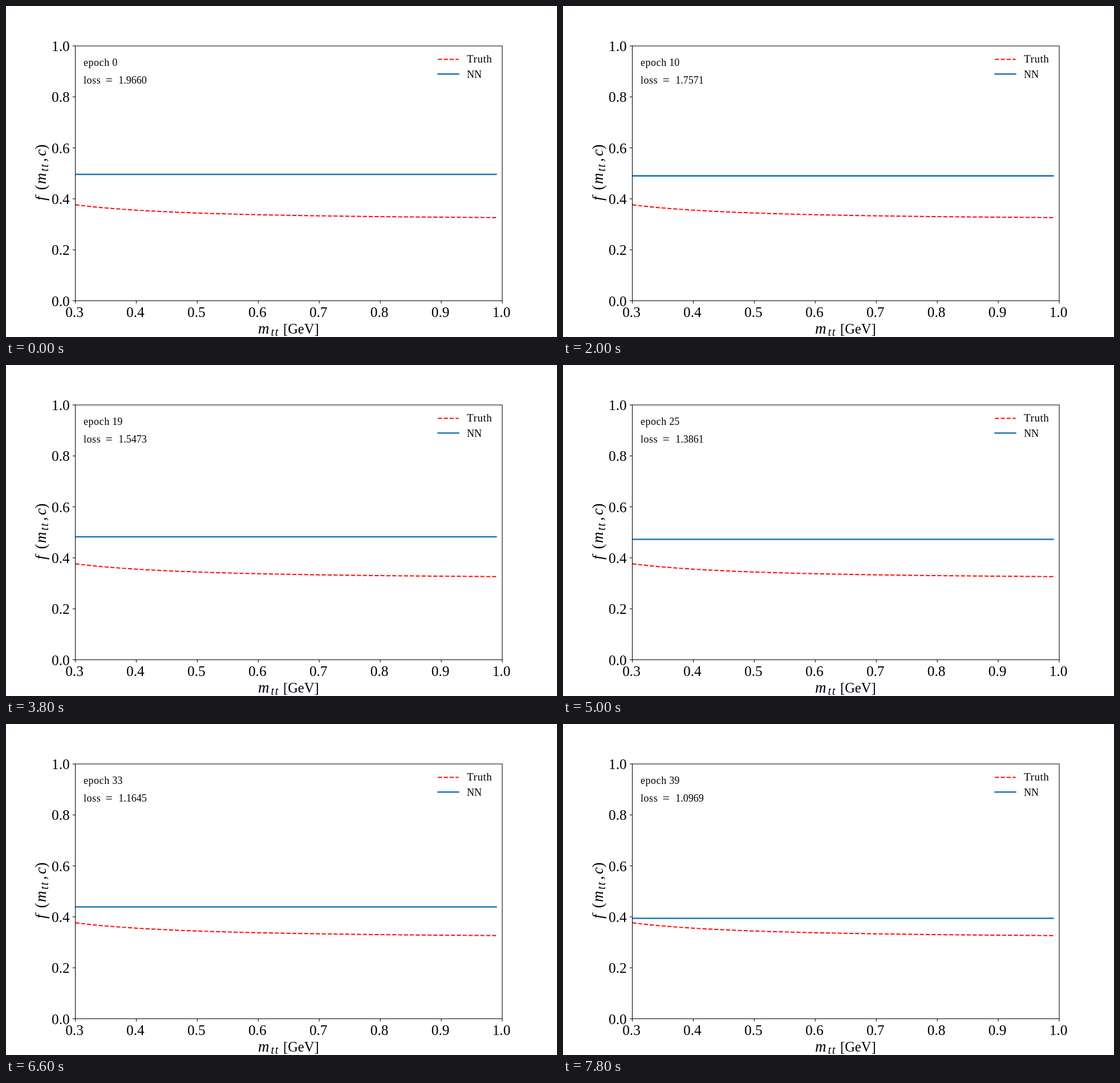
These frames come from a looping animation (966 by 580 pixels, 8000 ms). An HTML page:

```html
<!DOCTYPE html>
<html lang="en">
<head>
<meta charset="utf-8">
<title>Network training</title>
<style>
  html, body { margin: 0; width: 100%; height: 100%; overflow: hidden; background: #fff; }
  svg { display: block; }
  text { font: 18px "Liberation Serif", serif; white-space: pre; }
  .word { letter-spacing: .03em; }
  .tick { font-size: 25.3px; }
  .unit { font-size: 24.5px; }
  .math { font-size: 27px; font-style: italic; }
  .sub { font-size: 20px; font-style: italic; letter-spacing: .08em; }
  .paren { font-size: 27px; }
  .equals { font-size: 22px; }
  path { fill: none; }
  .axis { stroke: #000; stroke-width: 1.05; }
  .truth { stroke: #f00; stroke-width: 1.95; stroke-dasharray: 7.2 3.1; }
  .net { stroke: #1f77b4; stroke-width: 2.6; stroke-linecap: square; }
</style>
</head>
<body>
<svg width="966" height="580" viewBox="0 0 966 580">
  <clipPath id="plot"><rect x="121.5" y="70" width="748.5" height="446.5"/></clipPath>
</svg>
<script>
const svg = document.querySelector("svg");
const LEFT = 121.5, RIGHT = 870, TOP = 70, BOTTOM = 516.5;
const STEP = 200, EPOCHS = 40;

// epoch, loss, height of the network's line in pixels
const TRAINING = [
  [0, 1.9660, 295], [10, 1.7571, 297.6], [19, 1.5473, 301], [25, 1.3861, 305.5],
  [29, 1.2703, 310.7], [33, 1.1645, 320.5], [36, 1.1155, 329.4], [39, 1.0969, 340.5]
];

function add(tag, attributes, parent = svg) {
  const node = document.createElementNS("http://www.w3.org/2000/svg", tag);
  for (const name in attributes) node.setAttribute(name, attributes[name]);
  return parent.appendChild(node);
}

function label(x, y, string, style = "", anchor = "start", parent = svg) {
  const node = add("text", { x, y, class: style, "text-anchor": anchor }, parent);
  node.textContent = string;
  return node;
}

const line = (style, d, extra = {}) => add("path", { class: style, d, ...extra });
const xOf = mass => LEFT + (mass - 0.3) / 0.7 * (RIGHT - LEFT);
const yOf = value => BOTTOM - value * (BOTTOM - TOP);

// Smooth curve through the training points
function sample(epoch, column) {
  const last = TRAINING.length - 1;
  const slope = i => {
    const a = TRAINING[Math.max(i - 1, 0)], b = TRAINING[Math.min(i + 1, last)];
    return (b[column] - a[column]) / (b[0] - a[0]);
  };
  let i = 0;
  while (i < last - 1 && epoch >= TRAINING[i + 1][0]) i++;
  const a = TRAINING[i], b = TRAINING[i + 1], span = b[0] - a[0];
  const u = (epoch - a[0]) / span, v = 1 - u;
  return a[column] * v * v * (1 + 2 * u) + b[column] * u * u * (1 + 2 * v)
    + span * u * v * (slope(i) * v - slope(i + 1) * u);
}

// Curves
const xEnd = xOf(0.99);
const truth = [];
for (let mass = 0.3; mass < 0.995; mass += 0.01) {
  truth.push(`${xOf(mass).toFixed(2)},${yOf(0.3164 + 0.0099 * mass ** -1.5).toFixed(2)}`);
}
line("truth", "M" + truth.join("L"), { "clip-path": "url(#plot)" });
const netLine = line("net", "", { "clip-path": "url(#plot)" });

// Axes
line("axis", `M${LEFT} ${TOP}H${RIGHT}V${BOTTOM}H${LEFT}Z`);
for (let i = 3; i <= 10; i++) {
  const x = xOf(i / 10);
  line("axis", `M${x} ${BOTTOM}v4.7`);
  label(x - 1.5, 544.5, (i / 10).toFixed(1), "tick", "middle");
}
for (let i = 0; i <= 10; i += 2) {
  const y = yOf(i / 10);
  line("axis", `M${LEFT} ${y}h-4.7`);
  label(111.7, y + 9, (i / 10).toFixed(1), "tick", "end");
}

// Axis titles
label(442, 574, "m", "math");
label(464.5, 578, "tt", "sub");
label(486, 574, "[GeV]", "unit");
const title = add("g", { transform: "translate(69.5 343) rotate(-90)" });
[[2, 0, "f", "math"], [20.5, 0, "(", "paren"], [31, 0, "m", "math"], [53, 4, "tt", "sub"],
 [70, 0, ",", "math"], [80, 0, "c", "math"], [91.5, 0, ")", "paren"]]
  .forEach(([x, y, string, style]) => label(x, y, string, style, "start", title));

// Legend
line("truth", "M757.2 93.5H793.6");
line("net", "M757.6 119.2H793.4");
label(808, 99.3, "Truth", "word").style.fontSize = "19px";
label(808, 125.7, "NN");

// Readout
label(136, 105.3, "epoch", "word");
const epochText = label(186.3, 105.3, "");
label(136, 136, "loss", "word");
label(174.5, 137, "=", "equals");
const lossText = label(197.3, 136, "");

function draw(now) {
  const epoch = Math.floor(now / STEP) % EPOCHS;
  epochText.textContent = epoch;
  lossText.textContent = sample(epoch, 1).toFixed(4);
  netLine.setAttribute("d", `M${LEFT} ${sample(epoch, 2).toFixed(2)}H${xEnd}`);
  requestAnimationFrame(() => draw(performance.now()));
}
draw(performance.now());
</script>
</body>
</html>
```
